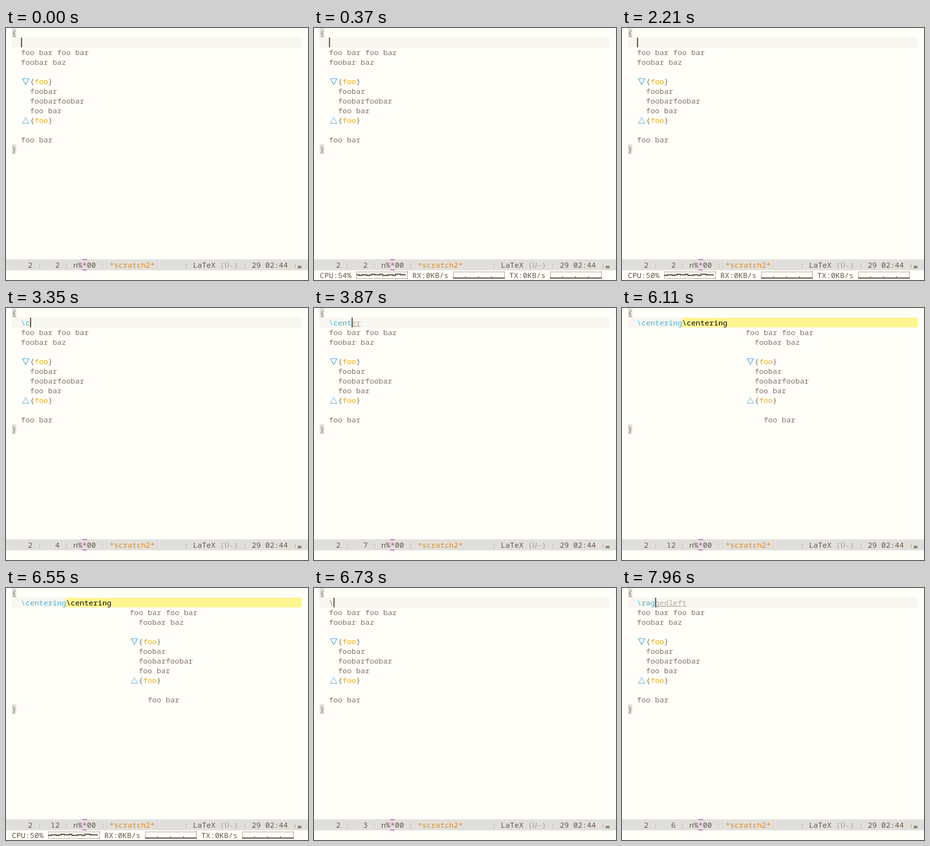
Recreate the animation shown at these times as an HTML page. Size 467 px wide and 390 px high, loop 8 s.

```html
<!DOCTYPE html>
<html lang="en">
<head>
<meta charset="utf-8">
<title>Editor session</title>
<style>
html, body { margin: 0; width: 100%; height: 100%; overflow: hidden; background: #fffef9; }
svg { display: block; width: 467px; height: 390px; }
text { font: 11.667px "Noto Sans Mono", "DejaVu Sans Mono", monospace; white-space: pre; }
</style>
</head>
<body>
<svg id="stage" viewBox="0 0 467 390" xmlns="http://www.w3.org/2000/svg"></svg>
<script>
const LOOP = 8000, CH = 7, ROW = 15, LEFT = 9;
const C = {
  text: '#84766a', dark: '#655a50', dim: '#a59e94', blue: '#4db2d3', ghost: '#b1aba2',
  gold: '#f0b010', orange: '#df8c22', pink: '#b0379a', bar: '#e1dfdb', line: '#f7f6f1',
  flash: '#fff590', tri: '#72b4d8', cursor: '#766757', plot: '#74685b'
};
const stage = document.getElementById('stage');

function add(tag, attrs, parent = stage) {
  const el = document.createElementNS('http://www.w3.org/2000/svg', tag);
  for (const k in attrs) el.setAttribute(k, attrs[k]);
  parent.appendChild(el);
  return el;
}
const rect = (x, y, width, height, fill, parent) => add('rect', { x, y, width, height, fill }, parent);
const path = (d, stroke, width, parent, extra) =>
  add('path', { d, stroke, 'stroke-width': width, fill: 'none', ...extra }, parent);
function label(x, y, str, fill, parent, weight = 400) {
  const el = add('text', { x, y, fill, 'font-weight': weight }, parent);
  el.textContent = str;
  return el;
}
const base = row => row * ROW + 12;
const show = (el, on) => el.setAttribute('visibility', on ? 'visible' : 'hidden');

// Buffer text
for (const [row, brace] of [[0, '{'], [12, '}']]) {
  rect(LEFT, row * ROW, CH, ROW, C.bar);
  label(LEFT, base(row), brace, C.text);
}
// row, column, text, shift in columns when centred
const lines = [
  [2, 2, 'foo bar foo bar', 24], [3, 2, 'foobar baz', 26], [5, 4, '{foo}', 24],
  [6, 4, 'foobar', 24], [7, 4, 'foobarfoobar', 24], [8, 4, 'foo bar', 24],
  [9, 4, '{foo}', 24], [11, 2, 'foo bar', 28]
].map(([row, col, str, shift]) => {
  const g = add('g', {});
  const x = LEFT + col * CH, y = base(row);
  if (str[0] === '{') {
    label(x, y, '{', C.text, g);
    label(x + CH, y, 'foo', C.gold, g);
    label(x + 4 * CH, y, '}', C.text, g);
    if (row === 5) path('M25.5 78.5H35.5L30.5 87.5Z', C.tri, 1.2, g);
    else path('M25.5 147.5H35.5L30.5 138.5Z', C.tri, 0.9, g);
  } else label(x, y, str, C.text, g);
  return { g, shift: shift * CH };
});

// Current line
rect(LEFT, ROW, 448, ROW, C.line);
const flash = add('g', {});
rect(93, ROW, 364, ROW, C.flash, flash);
const typed = label(23, base(1), '', C.blue);
const ghost = label(23, base(1), '', C.ghost);
const under = rect(23, 28, 0, 1, C.ghost);
label(93, base(1), '\\centering', '#0c0b08', flash);
const cursor = rect(23, ROW, 2, ROW, C.cursor);

// Mode line
const MODE_Y = 371;
rect(0, 358, 467, 17, C.bar);
label(34, MODE_Y, '2', C.dark);
for (const x of [48, 90, 146, 275, 366]) label(x, MODE_Y, ':', C.dim);
const column = label(69, MODE_Y, '', C.dark);
label(104, MODE_Y, 'n%', C.dark);
label(118, MODE_Y, '*', C.pink);
rect(118, 358, CH, 1, C.pink);
rect(118, 374, CH, 1, C.pink);
label(125, MODE_Y, '00', C.dark);
label(160, MODE_Y, '*scratch2*', C.orange, stage, 700);
label(289, MODE_Y, 'LaTeX', C.dark);
label(331, MODE_Y, '(U-)', C.dim);
label(380, MODE_Y, '29 02:44', C.dark);
for (const y of [366, 368, 370]) rect(446, y, 2, 1, '#d9a26c');
rect(451, 368, 6, 4, '#8f8d78');

// Echo area
const echo = add('g', {});
const ECHO_Y = 387;
const cpu = label(LEFT, ECHO_Y, '', C.dark, echo);
label(152, ECHO_Y, 'RX:0KB/s', C.dark, echo);
label(302, ECHO_Y, 'TX:0KB/s', C.dark, echo);
for (const x of [65, 215, 365]) {
  path(`M${x} 377.5H${x + 80}M${x} 387.5H${x + 80}M${x + .5} 377V388M${x + 79.5} 377V388`,
    C.plot, 1, echo, { 'stroke-dasharray': '1 1' });
  if (x === 65) continue;
  rect(x, 386, 80, 2, C.plot, echo);
  for (let i = 1; i < 4; i++) rect(x + i * 20 - 1, 384, 1, 2, C.plot, echo);
}
const load = path('', C.plot, 2, echo);

function loadPath(shift) {
  let d = 'M66 382';
  for (let i = 0; i < 19; i++) {
    const k = i + shift;
    const y = 382 + Math.round(0.8 * Math.sin(k * 1.9) + 0.6 * Math.sin(k * 0.7));
    d += `V${y}H${70 + i * 4}`;
  }
  return d;
}

// start, typed, suggested ending, load in percent, flash
const steps = [
  [0, ''], [370, '', '', 54], [2210, '', '', 50],
  [2580, '\\'], [3350, '\\c'], [3430, '\\c', 'entering'], [3510, '\\ce', 'ntering'],
  [3690, '\\cen', 'ter'], [3870, '\\cent', 'er'], [3960, '\\cente', 'r'], [4040, '\\center'],
  [4200, '\\centeri'], [4280, '\\centeri', 'ng'], [4360, '\\centerin', 'g'],
  [4510, '\\centering'], [6110, '\\centering', '', 0, true], [6550, '\\centering', '', 50, true],
  [6730, '\\'], [7610, '\\r'], [7690, '\\r', 'aggedright'], [7780, '\\ra', 'ggedright'],
  [7960, '\\rag', 'gedleft']
];

let current = null;
function render(t) {
  const step = steps.findLast(s => s[0] <= t);
  if (step === current) return;
  current = step;
  const [start, str, rest = '', percent = 0, lit = false] = step;
  const x = 23 + str.length * CH;
  typed.textContent = str;
  typed.setAttribute('fill', str.length > 1 ? C.blue : '#85805a');
  ghost.textContent = rest;
  ghost.setAttribute('x', x);
  under.setAttribute('x', x);
  under.setAttribute('width', rest.length * CH);
  cursor.setAttribute('x', x);
  show(cursor, !lit);
  show(flash, lit);
  column.textContent = String(str.length + 2).padStart(2, '\u00a0');
  const centred = str === '\\centering';
  for (const { g, shift } of lines) g.setAttribute('transform', `translate(${centred ? shift : 0} 0)`);
  show(echo, percent > 0);
  cpu.textContent = `CPU:${percent}%`;
  load.setAttribute('d', loadPath(start > 370 ? 1 : 0));
}

const origin = performance.now();
function tick() {
  render((performance.now() - origin) % LOOP);
  requestAnimationFrame(tick);
}
render(0);
requestAnimationFrame(tick);
</script>
</body>
</html>
```
